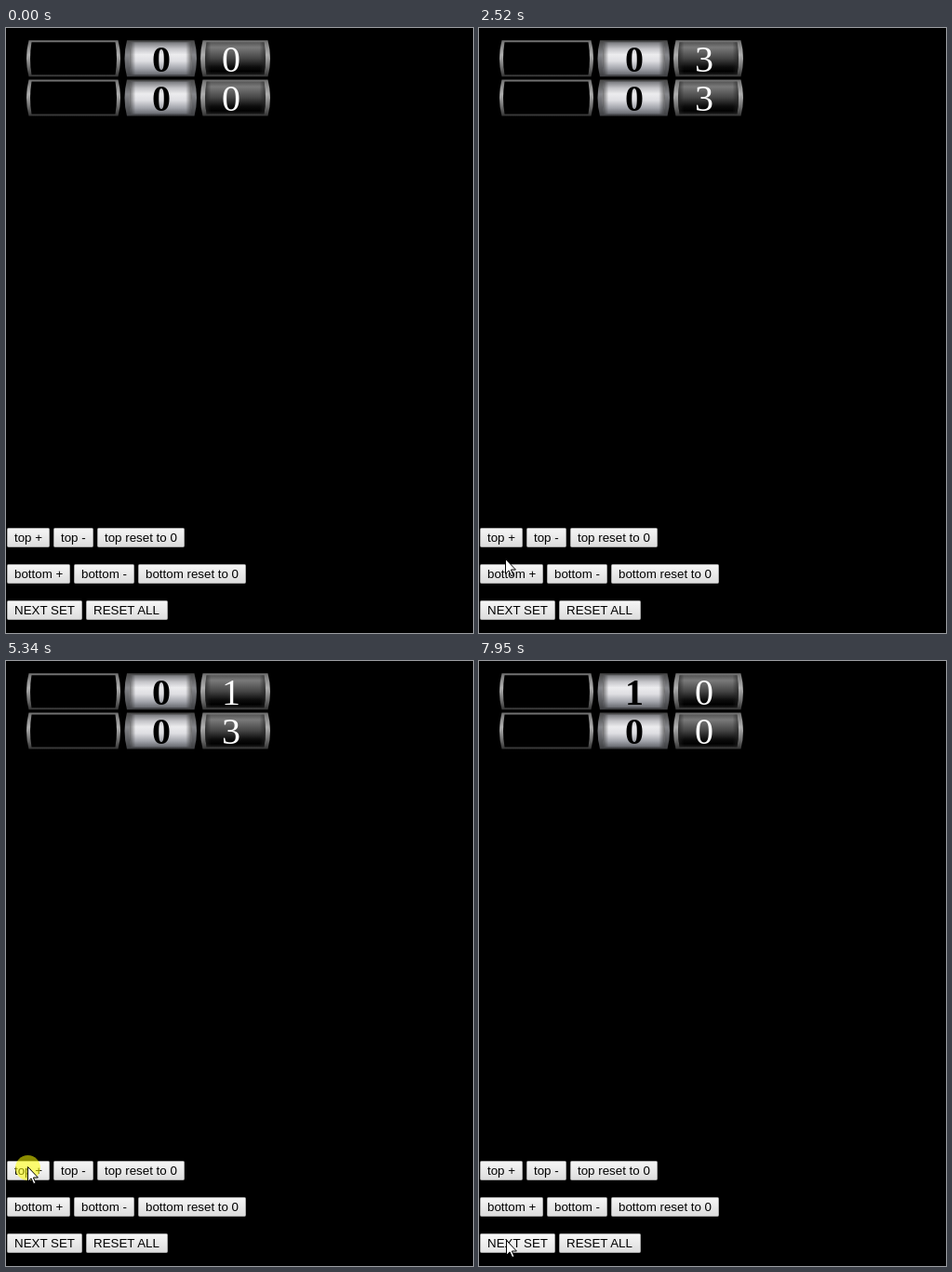
An HTML page that plays this animation: 502x650 px, repeating every 8 s.

```html
<!DOCTYPE html>
<html lang="en">
<head>
<meta charset="utf-8">
<title>Scoreboard</title>
<style>
  html, body { margin: 0; width: 100%; height: 100%; overflow: hidden; background: #000; }
  svg { display: block; width: 502px; height: 650px; }
  .digit { font: 40px "Liberation Serif", "Times New Roman", serif; }
  .bold { font-weight: bold; text-anchor: middle; }
  .label { font: 13.333px "Liberation Sans", Arial, sans-serif; }
</style>
</head>
<body>
<svg id="stage" viewBox="0 0 502 650" xmlns="http://www.w3.org/2000/svg">
  <defs>
    <linearGradient id="rim" x2="0" y2="1">
      <stop offset="0" stop-color="#6c6c6c"/>
      <stop offset=".12" stop-color="#858585"/>
      <stop offset=".4" stop-color="#b0b0b0"/>
      <stop offset=".7" stop-color="#777"/>
      <stop offset="1" stop-color="#333"/>
    </linearGradient>
    <linearGradient id="rimDark" x2="0" y2="1">
      <stop offset="0" stop-color="#444"/>
      <stop offset=".4" stop-color="#85868a"/>
      <stop offset="1" stop-color="#3c3d40"/>
    </linearGradient>
    <linearGradient id="silver" x2="0" y2="1">
      <stop offset="0" stop-color="#77787c"/>
      <stop offset=".2" stop-color="#c4c4c8"/>
      <stop offset=".38" stop-color="#ececee"/>
      <stop offset=".58" stop-color="#dedee2"/>
      <stop offset=".82" stop-color="#a0a2a9"/>
      <stop offset="1" stop-color="#66686e"/>
    </linearGradient>
    <linearGradient id="coal" x2="0" y2="1">
      <stop offset="0" stop-color="#555"/>
      <stop offset=".16" stop-color="#7a7a7a"/>
      <stop offset=".5" stop-color="#444"/>
      <stop offset=".76" stop-color="#0c0c0c"/>
      <stop offset=".9" stop-color="#000"/>
      <stop offset="1" stop-color="#1c1c1c"/>
    </linearGradient>
    <linearGradient id="edges">
      <stop offset="0" stop-color="#222" stop-opacity=".65"/>
      <stop offset=".1" stop-color="#222" stop-opacity="0"/>
      <stop offset=".9" stop-color="#222" stop-opacity="0"/>
      <stop offset="1" stop-color="#222" stop-opacity=".65"/>
    </linearGradient>
    <linearGradient id="face" x2="0" y2="1">
      <stop offset="0" stop-color="#f6f6f6"/>
      <stop offset=".4" stop-color="#ececec"/>
      <stop offset="1" stop-color="#dcdcdc"/>
    </linearGradient>
    <linearGradient id="faceHover" x2="0" y2="1">
      <stop offset="0" stop-color="#fafafa"/>
      <stop offset=".4" stop-color="#f2f2f2"/>
      <stop offset="1" stop-color="#e4e4e4"/>
    </linearGradient>
  </defs>
</svg>
<script>
const stage = document.getElementById("stage");
const LOOP = 8000;

function add(tag, attrs, text) {
  const node = document.createElementNS("http://www.w3.org/2000/svg", tag);
  for (const key in attrs) node.setAttribute(key, attrs[key]);
  if (text !== undefined) node.textContent = text;
  stage.appendChild(node);
  return node;
}

// Barrel outline with sides that bulge outwards.
function barrelPath(x, y, w, h, bulge) {
  const r = x + w, m = y + h / 2, b = y + h;
  return `M${x + bulge} ${y}H${r - bulge}Q${r + bulge} ${m} ${r - bulge} ${b}` +
    `H${x + bulge}Q${x - bulge} ${m} ${x + bulge} ${y}Z`;
}

function barrel(x, y, w, inset, rim, fill) {
  add("path", { d: barrelPath(x, y, w, 39, 2.5), fill: `url(#${rim})` });
  const d = barrelPath(x + inset, y + 2, w - 2 * inset, 35, 1.5);
  add("path", { d, fill });
  if (fill !== "#000") add("path", { d, fill: "url(#edges)" });
}

function scoreRow(y) {
  barrel(22, y, 101, 4, "rim", "#000");
  barrel(127.5, y, 77.5, 5, "rimDark", "url(#silver)");
  barrel(209, y, 75, 5, "rim", "url(#coal)");
  return {
    sets: add("text", { x: 167, y: y + 33.7, class: "digit bold", fill: "#000" }),
    points: add("text", { x: 232, y: y + 33.7, class: "digit", fill: "#fff" })
  };
}

function button(x, y, w, label) {
  const face = add("rect", {
    x: x + .5, y: y + .5, width: w - 1, height: 20, rx: 1, stroke: "#a6a6a6"
  });
  add("text", { x: x + 8, y: y + 15, class: "label", fill: "#000" }, label);
  return { face, x, y, w };
}

const top_ = scoreRow(13.3), bottom = scoreRow(55.5);
const buttons = [
  button(1, 537, 46, "top +"),
  button(51, 537, 43, "top -"),
  button(98, 537, 94, "top reset to 0"),
  button(1, 576, 68, "bottom +"),
  button(73, 576, 65, "bottom -"),
  button(142, 576, 116, "bottom reset to 0"),
  button(1, 615, 81, "NEXT SET"),
  button(86, 615, 88, "RESET ALL")
];
const glow = add("circle", { r: 13.5, fill: "#ff0", "fill-opacity": .55 });
const cursor = add("path", {
  d: "M.5 .5V16.3L4.1 12.9 6.7 18.7 8.9 17.7 6.4 12H11.4Z",
  fill: "#fff", stroke: "#000", "stroke-width": 1
});

// Pointer waypoints: time, x, y.
const route = [
  [70, 369, 640], [820, 25, 547], [1230, 25, 547], [1550, 22, 581],
  [1820, 22, 581], [2080, 26, 546], [2220, 26, 546], [2360, 27, 587],
  [2440, 27, 587], [2520, 28, 570], [2700, 29, 550], [3240, 29, 544],
  [3470, 28, 543], [3930, 28, 543], [4400, 140, 548], [4560, 140, 548],
  [5100, 23, 543], [7120, 23, 543], [7620, 29, 622], [LOOP, 29, 622]
];

// Clicks: press time, release time, action.
const clicks = [
  [900, 980, "top"], [1060, 1140, "top"],
  [1580, 1660, "bottom"], [1740, 1820, "bottom"],
  [2140, 2220, "top"], [2360, 2440, "bottom"],
  [3310, 3390, "top"], [3620, 3700, "top"], [3850, 3930, "top"],
  [4480, 4560, "reset"], [5180, 5260, "top"]
];
for (let i = 0; i < 8; i++) {
  const up = 5420 + i * 960 / 7;
  clicks.push([up - 80, up, "top"]);
}
clicks.push([6460, 6540, "top"], [6620, 6700, "top"], [7720, 7800, "next"]);

function pointerAt(t) {
  const i = Math.max(1, route.findIndex(p => p[0] >= t));
  const [t0, x0, y0] = route[i - 1], [t1, x1, y1] = route[i];
  const u = Math.min(1, Math.max(0, (t - t0) / (t1 - t0)));
  const k = u * u * (3 - 2 * u);
  return [Math.round(x0 + (x1 - x0) * k), Math.round(y0 + (y1 - y0) * k)];
}

function scoreAt(t) {
  const score = { top: 0, bottom: 0, sets: 0 };
  for (const [, up, action] of clicks) {
    if (t < up) break;
    if (action === "reset") score.top = 0;
    else if (action === "next") {
      score.top = score.bottom = 0;
      score.sets = 1;
    } else score[action]++;
  }
  return score;
}

function draw(t) {
  const score = scoreAt(t), [x, y] = pointerAt(t), shown = t >= 70;
  top_.sets.textContent = score.sets;
  top_.points.textContent = score.top;
  bottom.sets.textContent = 0;
  bottom.points.textContent = score.bottom;

  for (const b of buttons) {
    const over = shown && x >= b.x && x < b.x + b.w && y >= b.y && y < b.y + 21;
    b.face.setAttribute("fill", over ? "url(#faceHover)" : "url(#face)");
  }
  const pressed = clicks.some(([down, up]) => t >= down && t < up);
  glow.setAttribute("visibility", pressed ? "visible" : "hidden");
  glow.setAttribute("cx", x + .5);
  glow.setAttribute("cy", y + 1.5);
  cursor.setAttribute("visibility", shown ? "visible" : "hidden");
  cursor.setAttribute("transform", `translate(${x} ${y})`);
}

const start = performance.now();
function tick() {
  draw((performance.now() - start) % LOOP);
  requestAnimationFrame(tick);
}
draw(0);
requestAnimationFrame(tick);
</script>
</body>
</html>
```
